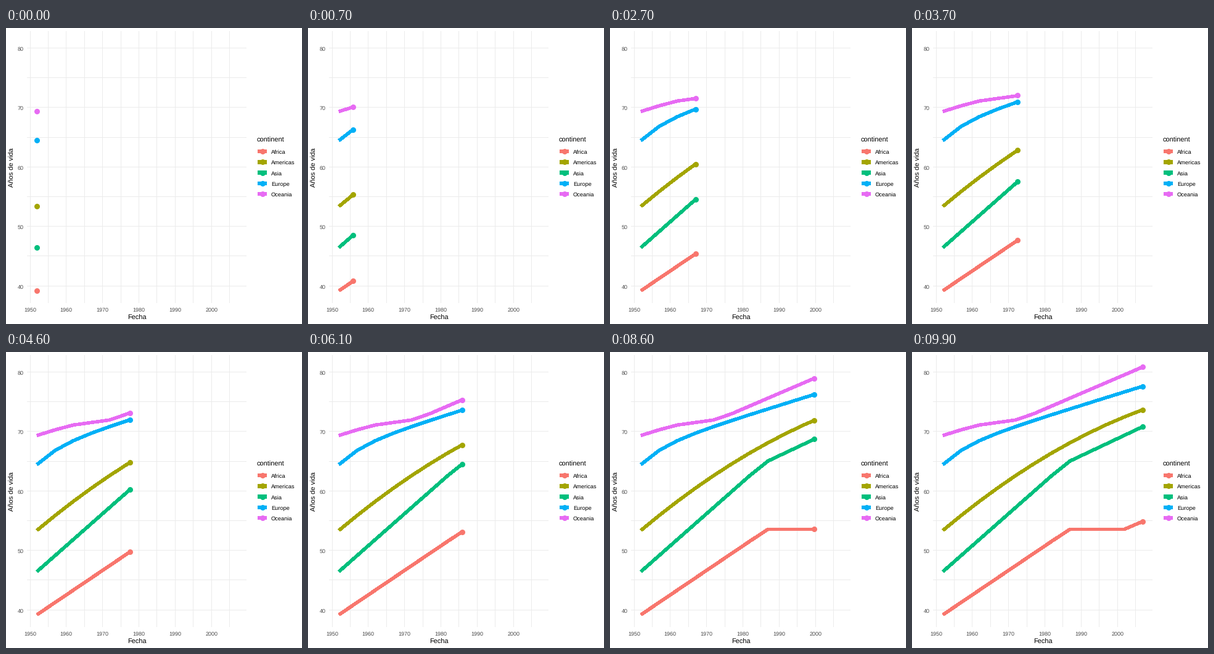
Animation of 480x480 px, one loop 10000 ms. Source, as a matplotlib script:

```python
import matplotlib.pyplot as plt
import numpy as np
from matplotlib.animation import FuncAnimation

SIZE, DPI = 480, 72          # at 72 dpi one point is one pixel
FRAMES, INTERVAL = 100, 100
LEFT, RIGHT, TOP, BOTTOM = 34.2, 390.0, 5.0, 446.0
INK, SOFT, GRID = "black", "#4D4D4D", "#EBEBEB"

plt.rcParams["font.family"] = "Liberation Sans"
plt.rcParams["text.hinting"] = "none"

# Life expectancy as a rule of s, the number of five-year steps since 1952
FIRST, LAST, STEP = 1952, 2007, 5
TRENDS = {
    "Africa": ("#F8766D", lambda s: np.minimum(39.14 + 2.06 * s, 53.5)
               + 1.3 * np.maximum(s - 10, 0)),
    "Americas": ("#A3A500", lambda s: 53.33 + 2.56 * s - 0.0653 * s**2),
    "Asia": ("#00BF7D", lambda s: np.minimum(46.4 + 2.69 * s, 54.9 + 1.44 * s)),
    "Europe": ("#00B0F6", lambda s: 67.1 + 0.95 * s - 2.7 * np.exp(-0.75 * s)),
    "Oceania": ("#E76BF3", lambda s: np.maximum(
        np.minimum(69.28 + 0.95 * s, 70.2 + 0.42 * s), 66.38 + 1.31 * s)),
}
YEARS = np.arange(FIRST, LAST + 1, STEP)


def padded(lo, hi):
    pad = 0.05 * (hi - lo)
    return lo - pad, hi + pad


X0, X1 = padded(FIRST, LAST)
Y0, Y1 = padded(39.1355, 80.7195)


def px(year):
    return LEFT + (np.asarray(year) - X0) / (X1 - X0) * (RIGHT - LEFT)


def py(age):
    return BOTTOM - (np.asarray(age) - Y0) / (Y1 - Y0) * (BOTTOM - TOP)


fig = plt.figure(figsize=(SIZE / DPI, SIZE / DPI), dpi=DPI, facecolor="white")
ax = fig.add_axes([0, 0, 1, 1])
ax.set_xlim(0, SIZE)
ax.set_ylim(SIZE, 0)
ax.axis("off")


def rule(xs, ys):
    ax.plot(xs, ys, color=GRID, lw=1, antialiased=False, snap=False,
            solid_capstyle="butt", zorder=1)


def label(x, y, text, size=9, color=INK, ha="left", **kw):
    ax.text(x, y, text, fontsize=size, color=color, ha=ha,
            **{"va": "baseline", **kw})


def stroke(xs, ys, color, lw=4.5):
    return ax.plot(xs, ys, color=color, lw=lw, antialiased=False, snap=False,
                   solid_capstyle="butt", solid_joinstyle="round", zorder=2)[0]


def dot(xs, ys, color):
    return ax.plot(xs, ys, "o", color=color, ms=9, mew=0, snap=False,
                   antialiased=False, zorder=3)[0]


# Grid and axis labels
for year in range(1950, 2006, 5):
    x = np.round(px(year)) + 0.5
    rule([x, x], [TOP, BOTTOM])
    if year % 10 == 0:
        label(x, 460, str(year), color=SOFT, ha="center")
for age in range(40, 81, 5):
    y = np.round(py(age)) + 0.5
    rule([LEFT, RIGHT], [y, y])
    if age % 10 == 0:
        label(29, y + 4, str(age), color=SOFT, ha="right")

label(212, 473, "Fecha", size=11, ha="center")
label(15, 225.8, "Años de vida", size=11, ha="right", va="center",
      rotation=90, rotation_mode="default")

# Legend
label(407, 185, "continent", size=11)
for i, (name, (color, _)) in enumerate(TRENDS.items()):
    y = 200 + 17.28 * i
    stroke([408.7, 422.5], [y, y], color, lw=5.5)
    dot([415.6], [y], color)
    label(430, y + 4, name, size=9.3)

trails = [(stroke([], [], color), dot([], [], color), trend((YEARS - FIRST) / STEP))
          for color, trend in TRENDS.values()]


def update(i):
    now = FIRST + (LAST - FIRST) * i / (FRAMES - 1)
    past = YEARS < now
    xs = px(np.append(YEARS[past], now))
    for line, head, ages in trails:
        ys = py(np.append(ages[past], np.interp(now, YEARS, ages)))
        line.set_data(xs, ys)
        head.set_data(xs[-1:], ys[-1:])
    return [a for line, head, _ in trails for a in (line, head)]


anim = FuncAnimation(fig, update, frames=FRAMES, interval=INTERVAL, repeat=True)
plt.show()
```
